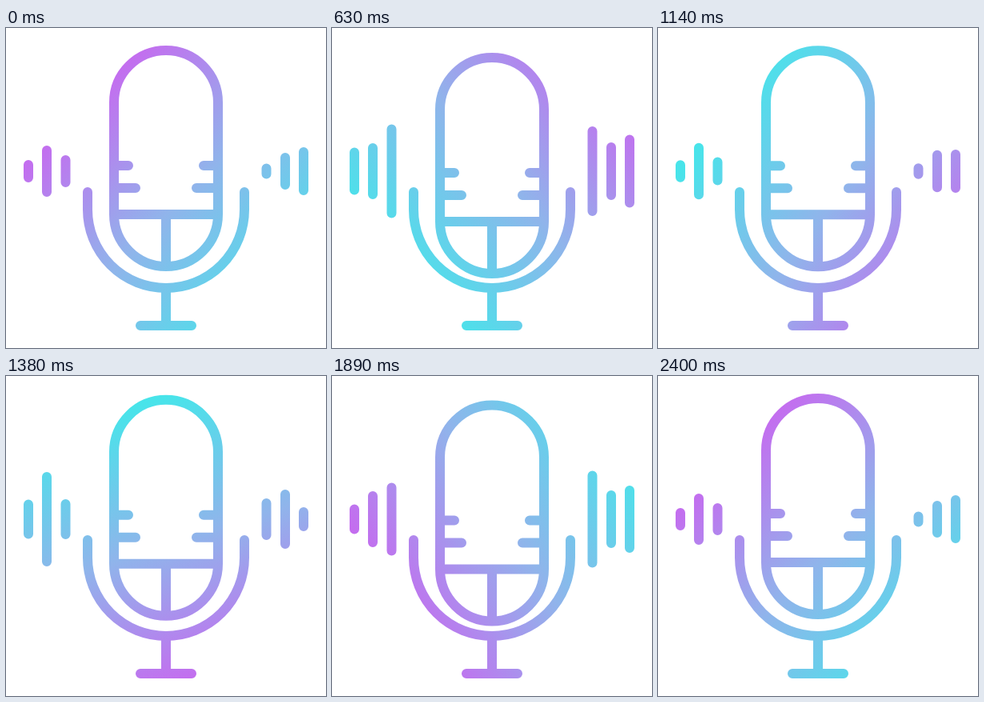
An HTML page with a canvas for the animation above (2430 ms loop, 400 px wide and 400 px high).

```html
<!DOCTYPE html>
<html lang="en">
<head>
<meta charset="utf-8">
<title>Microphone</title>
<style>
  html, body { margin: 0; width: 100%; height: 100%; overflow: hidden; background: #fff; }
  canvas { display: block; width: 400px; height: 400px; }
</style>
</head>
<body>
<canvas id="stage"></canvas>
<script>
const LOOP = 2430, STEP = 30, TURN = 2400, BEAT = 1200;
const canvas = document.getElementById('stage');
const ctx = canvas.getContext('2d');
const ratio = window.devicePixelRatio || 1;
canvas.width = canvas.height = 400 * ratio;
ctx.scale(ratio, ratio);
ctx.lineWidth = 12;
ctx.lineCap = ctx.lineJoin = 'round';

// Bar heights at these moments of each beat, caps included
const times = [0, 180, 270, 630, 690, 930];
const bars = [
  { x: 28, h: [28, 49, 44, 59, 37, 34] },
  { x: 51, h: [64, 118, 114, 70, 70, 118] },
  { x: 74.5, h: [40, 50, 45, 117, 91, 25] },
  { x: 325.5, h: [19, 52, 57, 112, 121, 44] },
  { x: 349, h: [46, 74, 118, 72, 72, 92] },
  { x: 372, h: [60, 30, 57, 91, 84, 22] }
];

// Periodic Hermite curve through the points of one bar
function heightAt(h, t) {
  const n = times.length;
  const time = i => times[(i + n) % n] + Math.floor(i / n) * BEAT;
  const value = i => h[(i + n) % n];
  const slope = i => (value(i + 1) - value(i - 1)) / (time(i + 1) - time(i - 1));
  let i = n - 1;
  while (times[i] > t) i--;
  const d = time(i + 1) - time(i);
  const u = (t - time(i)) / d, v = 1 - u;
  const y = value(i) * v * v * (1 + 2 * u) + value(i + 1) * u * u * (1 + 2 * v)
    + d * u * v * (slope(i) * v - slope(i + 1) * u);
  return Math.max(14, Math.min(122, y));
}

function line(x1, y1, x2, y2) {
  ctx.moveTo(x1, y1);
  ctx.lineTo(x2, y2);
}

function gradient(t) {
  const angle = 2 * Math.PI * t / TURN - 0.75 * Math.PI;
  const dx = 178 * Math.cos(angle), dy = 178 * Math.sin(angle);
  const g = ctx.createLinearGradient(231 - dx, 202 - dy, 231 + dx, 202 + dy);
  g.addColorStop(0, '#48e4ea');
  g.addColorStop(0.5, '#90b4eb');
  g.addColorStop(1, '#c66aef');
  return g;
}

function capsule(dy) {
  const top = 93 + dy, low = 233 + dy;
  ctx.moveTo(135, low);
  ctx.lineTo(135, top);
  ctx.arc(200, top, 65, Math.PI, 0);
  ctx.lineTo(265, low);
  ctx.arc(200, low, 65, 0, Math.PI);
  ctx.closePath();
  line(135, low, 265, low);
  line(200, low, 200, low + 65);
  for (const [y, w] of [[172, 18], [200, 27]]) {
    line(135, y + dy, 135 + w, y + dy);
    line(265, y + dy, 265 - w, y + dy);
  }
}

function stand() {
  ctx.moveTo(102, 205);
  ctx.lineTo(102, 227);
  ctx.arc(200, 227, 98, Math.PI, 0, true);
  ctx.lineTo(298, 205);
  line(200, 325, 200, 372);
  line(168, 372, 232, 372);
}

function draw(t) {
  const beat = t % BEAT;
  ctx.fillStyle = '#fff';
  ctx.fillRect(0, 0, 400, 400);
  ctx.strokeStyle = gradient(t);
  ctx.beginPath();
  capsule(4.5 * (1 - Math.cos(2 * Math.PI * beat / BEAT)));
  stand();
  for (const { x, h } of bars) {
    const half = heightAt(h, beat) / 2 - 6;
    line(x, 179 - half, x, 179 + half);
  }
  ctx.stroke();
}

const start = performance.now();
function tick() {
  const t = (performance.now() - start) % LOOP;
  draw(Math.floor(t / STEP) * STEP);
  requestAnimationFrame(tick);
}
tick();
</script>
</body>
</html>
```
